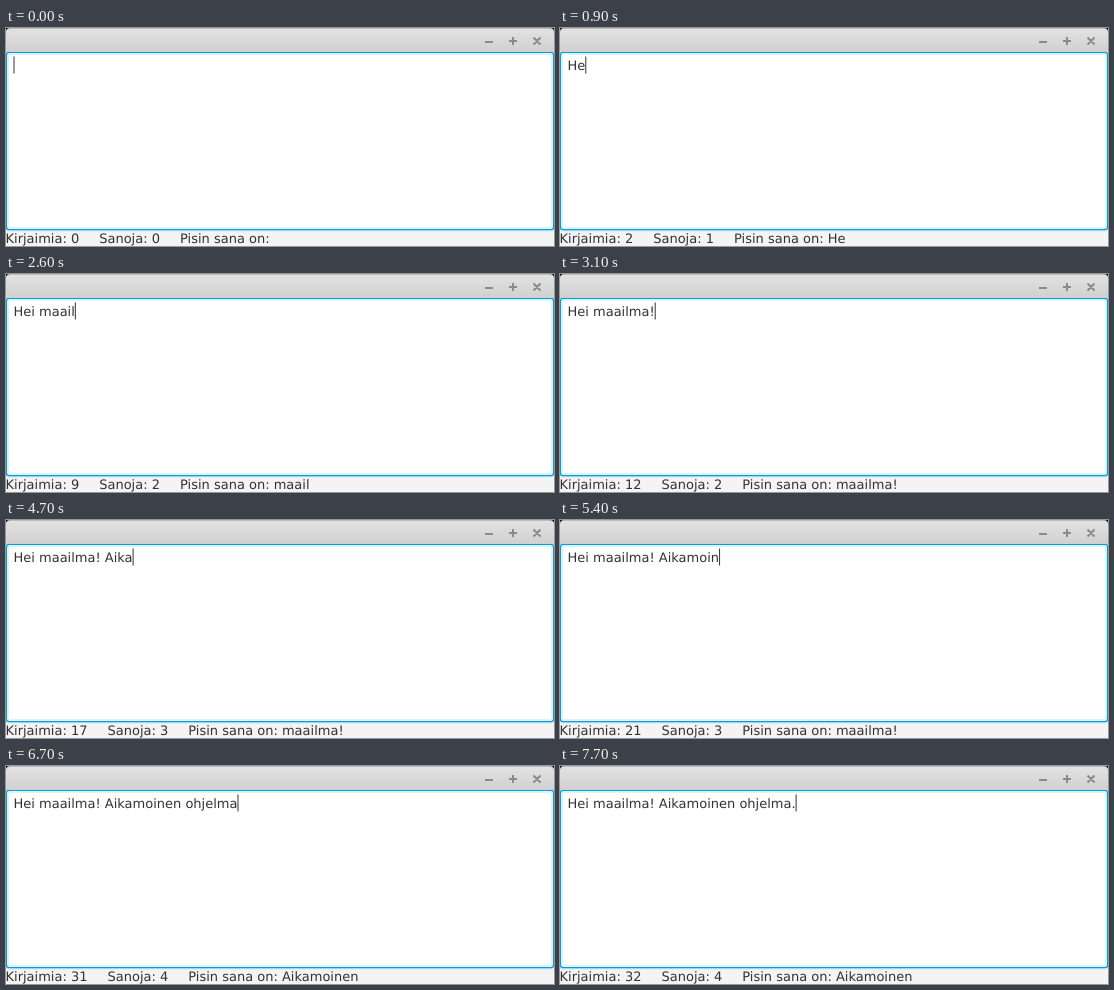
An HTML page for the animation above (8000 ms loop, 548 by 218 pixels).

```html
<!DOCTYPE html>
<html lang="fi">
<head>
<meta charset="utf-8">
<title>Tekstilaskuri</title>
<style>
  html, body { margin: 0; width: 100%; height: 100%; overflow: hidden; background: #f4f4f4; }
  svg { display: block; }
  text {
    font: 13px "DejaVu Sans", sans-serif;
    fill: #333;
    white-space: pre;
    text-rendering: geometricPrecision;
  }
</style>
</head>
<body>
<svg width="548" height="218" viewBox="0 0 548 218">
  <defs>
    <linearGradient id="bar" x2="0" y2="1">
      <stop stop-color="#e2e2e2"/>
      <stop offset="1" stop-color="#d0d0d0"/>
    </linearGradient>
  </defs>

  <!-- focused text area -->
  <rect x="-.2" y="23.8" width="548.4" height="178.4" rx="3" fill="#039ed3"/>
  <rect x="1" y="25" width="546" height="176" rx="2" fill="#fff"/>
  <rect x="-1.4" y="22.6" width="550.8" height="180.8" rx="4" fill="#039ed3" opacity=".133"/>
  <rect x="3" y="27" width="542" height="172" fill="#fff"/>

  <!-- title bar -->
  <path d="M0 0H548V24H0z" fill="#000"/>
  <path d="M0 24V4Q0 0 4 0H544Q548 0 548 4V24z" fill="#bcbcbc"/>
  <path d="M0 24V5Q0 1 4 1H544Q548 1 548 5V24z" fill="url(#bar)"/>
  <g fill="none" stroke-width="2">
    <path id="buttons" d="M479 14h8M503 13h8M507 9v8M527.5 9.5l7 7M534.5 9.5l-7 7" stroke="#8a8a8a"/>
  </g>

  <text id="typed" x="7.5" y="42"></text>
  <rect id="caret" y="28.5" width="1" height="17" fill="#333"/>
  <text class="label" y="215"></text>
  <text class="label" y="215"></text>
  <text class="label" y="215"></text>
</svg>
<script>
const LOOP = 8000;
const MESSAGE = "Hei maailma! Aikamoinen ohjelma.";

// Time of each key press and the caret's dark spells, in tenths of a second
const KEYS = [8, 9, 14, 18, 20, 22, 23, 24, 26, 27, 28, 31, 34, 43, 44, 44,
              47, 50, 50, 52, 54, 55, 56, 57, 60, 61, 62, 63, 65, 65, 67, 77];
const CARET_OFF = [[3, 8], [39, 43], [71, 76]];

const typed = document.getElementById("typed");
const caret = document.getElementById("caret");
const labels = document.querySelectorAll(".label");

function showStatus(text) {
  const words = text.split(" ").filter(Boolean);
  const longest = words.reduce((best, word) => word.length > best.length ? word : best, "");
  const captions = [
    `Kirjaimia: ${text.length}`,
    `Sanoja: ${words.length}`,
    `Pisin sana on: ${longest}`
  ];
  let x = -0.5;
  labels.forEach((label, i) => {
    label.textContent = captions[i];
    label.setAttribute("x", x);
    x += label.getComputedTextLength() + 20;
  });
}

function draw() {
  const tick = performance.now() % LOOP / 100;
  const text = MESSAGE.slice(0, KEYS.filter(key => key <= tick).length);
  typed.textContent = text;
  caret.setAttribute("x", 7.5 + (text ? typed.getComputedTextLength() : 0));
  const hidden = CARET_OFF.some(([from, to]) => tick >= from && tick < to);
  caret.setAttribute("visibility", hidden ? "hidden" : "visible");
  showStatus(text);
  requestAnimationFrame(draw);
}
draw();
</script>
</body>
</html>
```
